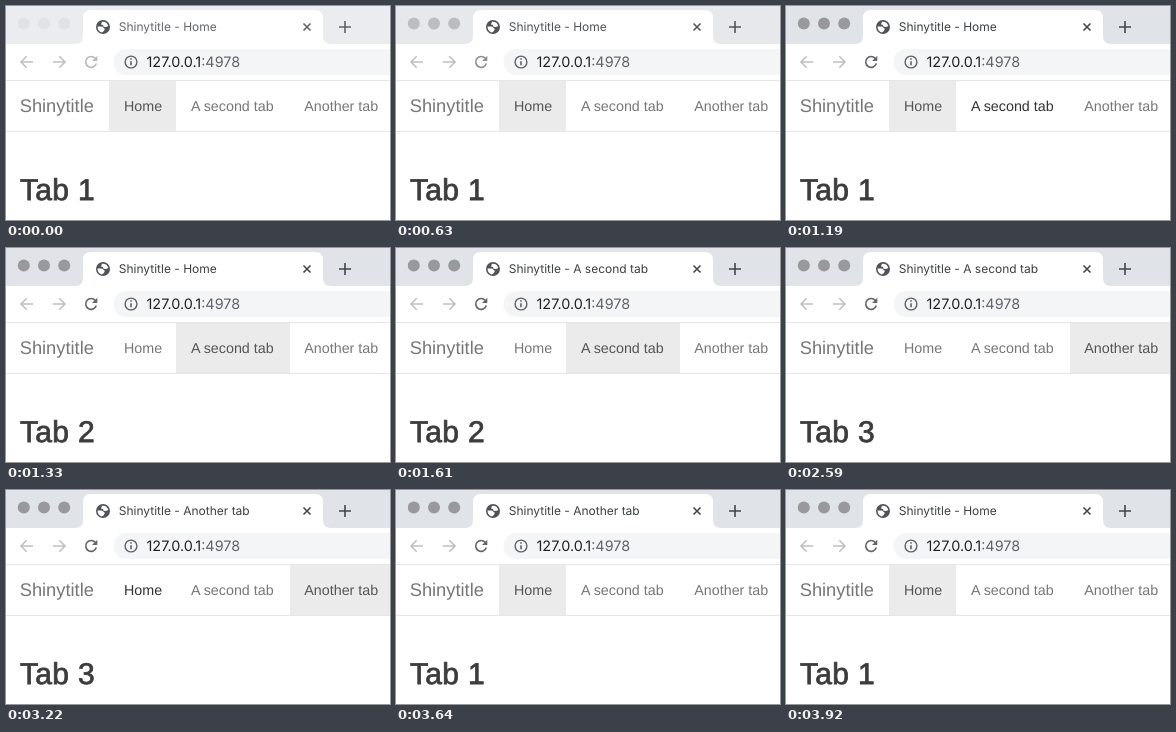
Recreate the animation shown at these times as an HTML page. Size 384 by 214 pixels, loop 4.27 s.

```html
<!DOCTYPE html>
<html lang="en">
<head>
<meta charset="utf-8">
<title>Shinytitle</title>
<style>
  html, body { margin: 0; width: 100%; height: 100%; overflow: hidden; background: #fff; }
  svg { display: block; width: 100vw; height: 100vh; }
  text { font-family: "Liberation Sans", Arial, sans-serif; white-space: pre; text-rendering: geometricPrecision; }
  .ui { font-family: Inter, Roboto, sans-serif; }
  .line { fill: none; stroke-width: 1.6; }
  .nav { font-size: 14.3px; }
</style>
</head>
<body>
<svg viewBox="0 0 384 214">
  <!-- Tab strip -->
  <rect id="strip" width="384" height="38"/>
  <g id="lights">
    <circle cx="17.8" cy="17.6" r="6"/>
    <circle cx="38" cy="17.6" r="6"/>
    <circle cx="58.2" cy="17.6" r="6"/>
  </g>
  <path fill="#fff" d="M69 38q8 0 8-8V12q0-8 8-8H309q8 0 8 8V30q0 8 8 8z"/>
  <circle cx="97" cy="21" r="7" fill="#505357"/>
  <path fill="#fff" d="M91.5 20.5h3.800c2 0 2 2 3.600 2.200l-1 2.200-2 1.600q-4.200-1-4.400-6zM96 15.800q5-.5 6.300 4.200l-2.300 1-2.500-.2-.5-1.800-2-.6z"/>
  <text id="title" class="ui" x="112.700" y="25" font-size="12"></text>
  <path id="close" class="line" d="M297.500 17.500l7 7m0-7l-7 7"/>
  <path id="plus" class="line" d="M333 21h12m-6-6v12"/>

  <!-- Toolbar -->
  <g class="line" stroke="#bec0c2">
    <path d="M27 56H15m5.700-5.700L15 56l5.700 5.700"/>
    <path d="M47 56h12m-5.700-5.700L59 56l-5.700 5.700"/>
  </g>
  <g id="reload">
    <path class="line" d="M89.300 52.500A5.400 5.400 0 1 0 90.300 57.500"/>
    <path stroke="none" d="M91.300 49.800v5.300H86z"/>
  </g>
  <rect x="107.500" y="43" width="300" height="26" rx="13" fill="#f4f5f6"/>
  <circle class="line" cx="125" cy="56" r="5.900" style="stroke-width:1.400" stroke="#5f6368"/>
  <path class="line" stroke="#5f6368" d="M125 55.200v4m0-6.900v1.500"/>
  <text class="ui" x="140.500" y="61" font-size="14.400" fill="#202124">127.0.0.1<tspan fill="#5f6368">:4978</tspan></text>

  <!-- Page -->
  <rect y="74" width="384" height="52" fill="#e6e6e6"/>
  <rect y="75" width="384" height="50" fill="#fff"/>
  <rect id="active" y="75" height="50" fill="#ebebeb"/>
  <text x="13.700" y="106" font-size="18.300" fill="#777">Shinytitle</text>
  <text class="nav" x="118" y="105">Home</text>
  <text class="nav" x="185" y="105">A second tab</text>
  <text class="nav" x="298.300" y="105">Another tab</text>
  <text id="heading" x="14" y="193.500" font-size="30" letter-spacing=".3" fill="#3c3c3c" stroke="#3c3c3c" stroke-width=".8"></text>
</svg>
<script>
  const LOOP = 4270;
  const get = id => document.getElementById(id);
  const links = [...document.querySelectorAll('.nav')];
  const edges = [103, 170, 284, 384];

  // Each track is a list of [start time, value] pairs.
  const focusTrack = [[0, 0], [630, 0.5], [700, 1]];
  const pageTrack = [[0, 0], [1330, 1], [2590, 2], [3640, 0]];
  const titleTrack = [[0, 0], [1610, 1], [2940, 2], [3920, 0]];
  const hoverTrack = [[0, -1], [1190, 1], [2170, 2], [3080, 1], [3220, 0]];
  const at = (track, t) => track.filter(([start]) => start <= t).pop()[1];

  const mix = (from, to, k) =>
    `rgb(${from.map((c, i) => Math.round(c + (to[i] - c) * k))})`;
  const paint = (id, attr, from, to, k) => get(id).setAttribute(attr, mix(from, to, k));

  function draw() {
    const t = performance.now() % LOOP;
    const focus = at(focusTrack, t);
    const page = at(pageTrack, t);
    const hover = at(hoverTrack, t);

    paint('strip', 'fill', [235, 236, 240], [224, 227, 232], focus);
    paint('lights', 'fill', [225, 226, 229], [152, 152, 157], focus);
    paint('title', 'fill', [100, 103, 107], [60, 64, 67], focus);
    paint('close', 'stroke', [95, 98, 102], [66, 69, 73], focus);
    paint('plus', 'stroke', [95, 98, 102], [66, 69, 73], focus);
    paint('reload', 'stroke', [184, 186, 189], [98, 101, 105], focus);
    paint('reload', 'fill', [184, 186, 189], [98, 101, 105], focus);

    get('title').textContent = 'Shinytitle - ' + links[at(titleTrack, t)].textContent;
    get('heading').textContent = 'Tab ' + (page + 1);
    get('active').setAttribute('x', edges[page]);
    get('active').setAttribute('width', edges[page + 1] - edges[page]);
    links.forEach((link, i) =>
      link.setAttribute('fill', i === page ? '#555' : i === hover ? '#333' : '#777'));
    requestAnimationFrame(draw);
  }
  draw();
</script>
</body>
</html>
```
